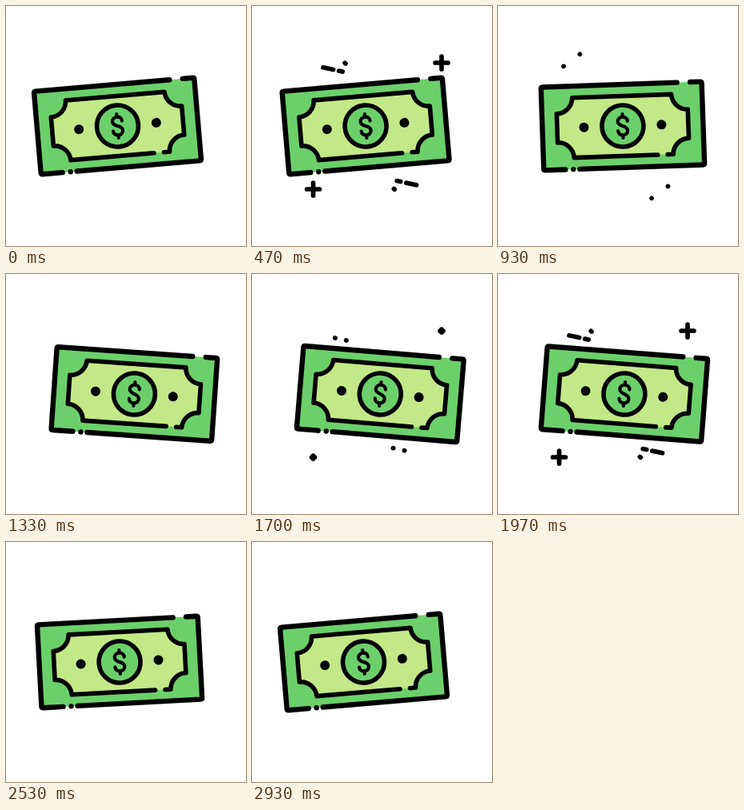
These frames come from a looping animation (300 by 300 pixels, 3000 ms). An HTML page:

```html
<!DOCTYPE html>
<html lang="en">
<head>
<meta charset="utf-8">
<title>Banknote</title>
<style>
  html, body { margin: 0; width: 100%; height: 100%; overflow: hidden; background: #fff; }
  svg { display: block; width: 100vw; height: 100vh; }
  .line { fill: none; stroke: #000; stroke-width: 5.6; stroke-linecap: round; stroke-linejoin: round; }
  .edge { stroke-width: 6.4; }
  .spark { stroke-width: 5.7; }
  .sign { stroke-width: 4.2; }
</style>
</head>
<body>
<svg viewBox="0 0 300 300">
  <g id="bill">
    <rect x="-100.5" y="-52" width="201" height="104" rx="2" fill="#6bd06b"/>
    <path class="line edge" d="M-55.5 52H98.5q2 0 2-2V-50q0-2-2-2H86M69.5-52H-98.5q-2 0-2 2V50q0 2 2 2H-73.5M-63.5 52h.01"/>
    <path fill="#c4e887" d="M-62-37.5H62A20 20 0 0 0 82-18V18A20 20 0 0 0 62 37.5H-62A20 20 0 0 0-82 18V-18A20 20 0 0 0-62-37.5Z"/>
    <path class="line" d="M42.5 37.5H-62A20 20 0 0 0-82 18V-18A20 20 0 0 0-62-37.5H62A20 20 0 0 0 82-18V18A20 20 0 0 0 62 37.5H55"/>
    <circle class="line" r="26" style="fill:#6bd06b"/>
    <circle cx="-48.5" r="6"/>
    <circle cx="48.5" r="6"/>
    <path class="line sign" d="M6-6C6-9.5 3.5-11.3 0-11.3S-6-9-6-5.8C-6-2.3-3-1.2 0 0S6 2.3 6 5.8 3.5 11.3 0 11.3-6 9.5-6 6M0-11.3V-15M0 11.3V15"/>
  </g>
  <g id="sparks"></g>
</svg>
<script>
const LOOP = 3000, BURST = 1500;
const bill = document.getElementById('bill');
const sparks = document.getElementById('sparks');

const ease = u => u < 0.5 ? 4 * u ** 3 : 1 - 4 * (1 - u) ** 3;
const ramp = (t, from, to) => ease(Math.min(1, Math.max(0, (t - from) / (to - from))));

function addPath() {
  const path = document.createElementNS('http://www.w3.org/2000/svg', 'path');
  path.setAttribute('class', 'line spark');
  sparks.appendChild(path);
  return path;
}

// Each streak travels a -> b; head and tail are time windows within a burst.
const streaks = [
  { a: [104, 80], b: [82, 75.3], head: [100, 750], tail: [270, 940], end: 960 },
  { a: [118, 83], b: [108, 81], head: [100, 600], tail: [200, 750], end: 800 },
  { a: [117, 72], b: [102.3, 60.3], head: [350, 850], tail: [640, 940], end: 960 }
].map(s => {
  const path = addPath(), mirror = addPath();
  mirror.setAttribute('transform', 'rotate(180 147.2 150.3)');
  return { ...s, paths: [path, mirror] };
});

const pluses = [[237, 71], [76.5, 229]].map(([x, y]) => ({ x, y, path: addPath() }));

function drawStreak({ a, b, head, tail, end, paths }, t) {
  const at = u => a.map((v, i) => (v + (b[i] - v) * u).toFixed(2)).join(' ');
  const visible = t > head[0] + 50 && t < end;
  const d = visible ? `M${at(ramp(t, ...tail))}L${at(ramp(t, ...head) + 0.001)}` : '';
  paths.forEach(p => p.setAttribute('d', d));
}

function drawPlus({ x, y, path }, t) {
  const r = 8 * (ramp(t, 70, 400) - ramp(t, 430, 720));
  path.setAttribute('d', r > 0.001 ? `M${x - r} ${y}h${2 * r}M${x} ${y - r}v${2 * r}` : '');
}

function render(time) {
  const t = time % LOOP, burst = t % BURST;
  const x = 139.5 + 21 * (ramp(t, 0, 1500) - ramp(t, 1500, 3000));
  const angle = -4.9 + 9.7 * (ramp(t, 370, 1700) - ramp(t, 1700, 3000));
  bill.setAttribute('transform', `translate(${x} 150) rotate(${angle})`);
  streaks.forEach(s => drawStreak(s, burst));
  pluses.forEach(p => drawPlus(p, burst));
}

const start = performance.now();
function tick() {
  render(performance.now() - start);
  requestAnimationFrame(tick);
}
tick();
</script>
</body>
</html>
```
